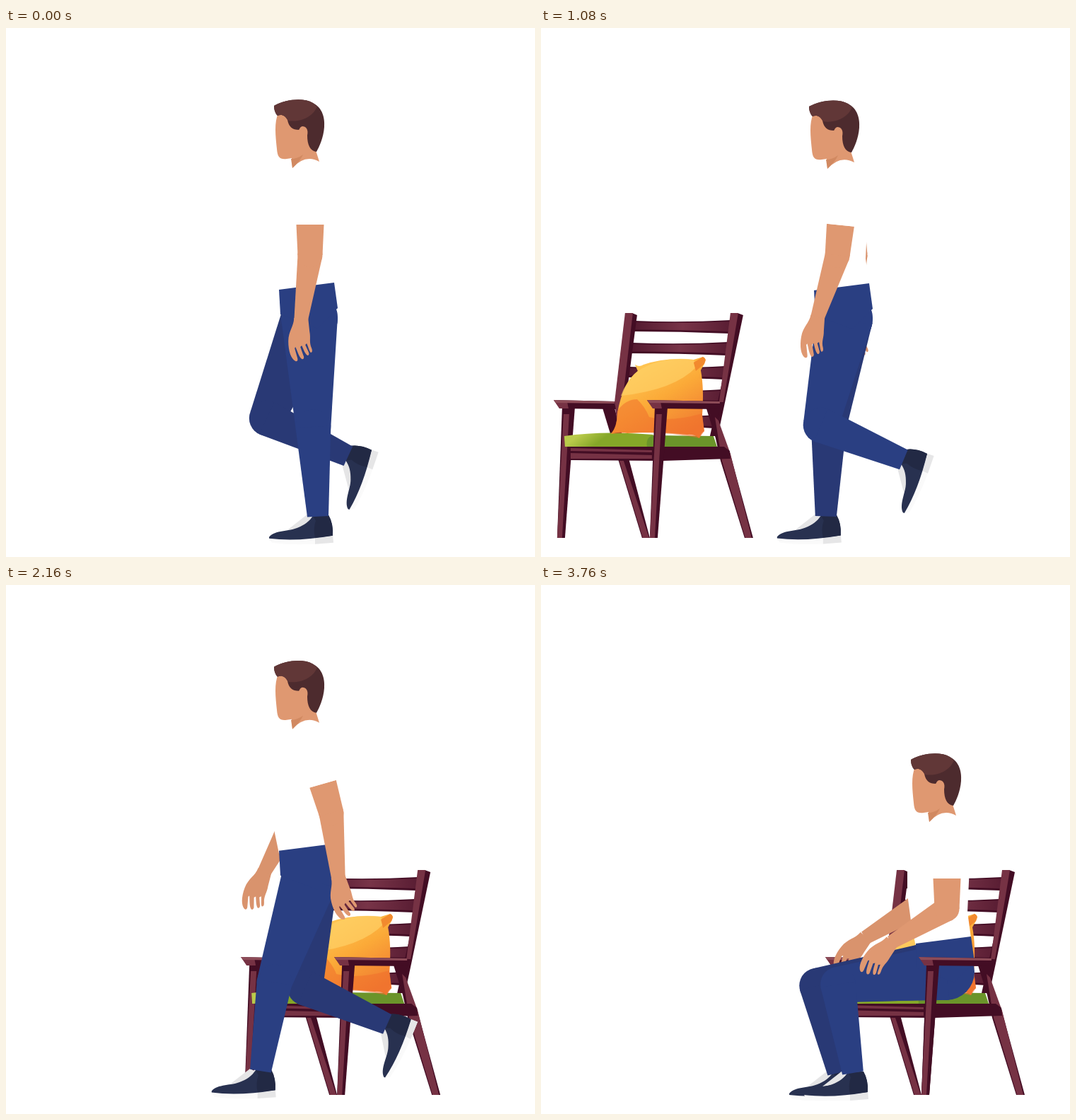
Animation of 748 by 748 pixels, one loop 4.4 s. Source, as an HTML page with a canvas:

```html
<!DOCTYPE html>
<html>
<head>
<meta charset="utf-8">
<style>
html, body { margin: 0; width: 100%; height: 100%; overflow: hidden; background: #fff; }
canvas { display: block; }
</style>
</head>
<body>
<canvas width="748" height="748"></canvas>
<script>
const ctx = document.querySelector('canvas').getContext('2d');
const LOOP = 4400, STEP = 40, END = 3760, STRIDE = 2370, SEATED = 2400;
const THIGH = 154, SHIN = 127, UPPER = 108, FOREARM = 92, SLEEVE = 65;
const SKIN = '#df9871', SKIN_FAR = '#d9936d', PANTS = '#2a3f82', PANTS_FAR = '#293975';
const WOOD = '#763244', DARK = '#430d24', EDGE = '#8d4c58';

// Walk cycle: phase, upper angle, lower angle (degrees forward from straight down), foot tilt
const legCycle = [
  [0, -2, -3, 0], [.088, -9, -13.5, 0], [.2, -17, -30, 17], [.298, -14.5, -43, 38],
  [.4, 0, -66, 62], [.5, 23, -65, 67], [.591, 41.5, -39.6, 42], [.7, 48, -8, 8],
  [.798, 44.5, 19, -20], [.85, 30, 22, -8], [.925, 16, 6, 0]
];
const armCycle = [
  [0, 0, 8], [.091, 6, 15], [.25, 24, 57], [.3, 23, 54], [.5, 0, 8],
  [.591, -16.4, -6], [.798, -32, -22], [.9, -18, -8]
];
// Time, x, y
const bodyPath = [
  [0, 0, 0], [200, 0, 5], [520, 0, 12], [720, 0, 9], [1060, 0, 1.5], [1185, 0, 0],
  [1400, 0, 5], [1740, 0, 11.5], [1880, 0, 12], [2060, 0, 9], [2240, 0, 3], [2370, 0, 0],
  [2440, 0, 5.5], [2800, 3, 5], [3000, 15, 7], [3240, 53, 14], [3360, 76, 29],
  [3560, 117, 88], [3760, 144, 137]
];
// Time, ankle x, ankle y, foot tilt
const nearStep = [[2370, 441, 690, 0], [2440, 467, 690, 0], [2640, 462, 687, 4], [2840, 441, 690, 0]];
const farStep = [[2370, 483, 603, 67], [2440, 482, 612, 67], [2680, 426, 665, 22], [2840, 420, 690, 0]];
// Time, upper angle, lower angle
const nearRest = [[2370, 0, 8], [2960, 0, 8], [3240, 0, 21.5], [3760, 0, 59]];
const farRest = [[2370, 0, 8], [2960, 0, 8], [3240, 0, 18], [3760, 20, 59]];

function slope(keys, i, c) {
  const a = keys[i - 1], b = keys[i], d = keys[i + 1];
  if (!a || !d || (b[c] - a[c]) * (d[c] - b[c]) <= 0) return 0;
  return (d[c] - a[c]) / (d[0] - a[0]);
}

function sample(keys, t) {
  const last = keys.length - 1;
  if (t <= keys[0][0]) return keys[0].slice(1);
  if (t >= keys[last][0]) return keys[last].slice(1);
  const i = keys.findIndex(k => k[0] > t) - 1;
  const a = keys[i], b = keys[i + 1], span = b[0] - a[0], u = (t - a[0]) / span;
  return a.slice(1).map((v, n) => {
    const c = n + 1, m = slope(keys, i, c) * span, k = slope(keys, i + 1, c) * span;
    return v + m * u + (3 * (b[c] - v) - 2 * m - k) * u * u + (2 * (v - b[c]) + m + k) * u ** 3;
  });
}

function cycle(keys, phase) {
  const shift = (k, d) => [k[0] + d, ...k.slice(1)];
  return sample([shift(keys.at(-1), -1), ...keys, shift(keys[0], 1), shift(keys[1], 1)], phase % 1);
}

const reach = ([x, y], length, deg) => {
  const a = deg * Math.PI / 180;
  return [x - length * Math.sin(a), y + length * Math.cos(a)];
};

function bendKnee(hip, ankle) {
  const dx = ankle[0] - hip[0], dy = ankle[1] - hip[1];
  const d = Math.min(Math.hypot(dx, dy), THIGH + SHIN);
  const along = (THIGH ** 2 - SHIN ** 2 + d * d) / (2 * d);
  const out = Math.sqrt(Math.max(0, THIGH ** 2 - along ** 2));
  return [hip[0] + (dx * along - dy * out) / d, hip[1] + (dy * along + dx * out) / d];
}

function fill(color, path) {
  ctx.fillStyle = color;
  ctx.fill(new Path2D(path));
}

const poly = (color, ...points) => fill(color, 'M' + points.join('L') + 'Z');

function disc([x, y], r, color) {
  ctx.fillStyle = color;
  ctx.beginPath();
  ctx.arc(x, y, r, 0, 7);
  ctx.fill();
}

function taper([x, y], [u, v], r, s, color) {
  const d = Math.hypot(u - x, v - y) || 1, nx = (v - y) / d, ny = (x - u) / d;
  poly(color, [x + nx * r, y + ny * r], [u + nx * s, v + ny * s],
    [u - nx * s, v - ny * s], [x - nx * r, y - ny * r]);
}

function at([x, y], deg, draw) {
  ctx.save();
  ctx.translate(x, y);
  ctx.rotate(deg * Math.PI / 180);
  draw();
  ctx.restore();
}

function gradient(x0, y0, x1, y1, ...colors) {
  const g = ctx.createLinearGradient(x0, y0, x1, y1);
  colors.forEach((c, i) => g.addColorStop(i / (colors.length - 1), c));
  return g;
}

function shoe() {
  fill('#e5e5e6', 'M-43 19L-15-3L-6 1Q-14 13-30 17Z');
  fill('#fafafa', 'M-69 31Q-30 34 21 26L22 37Q-30 42-65 37Z');
  fill('#e6e6e7', 'M-4 30L21 26L22 37L-4 39Z');
  fill('#283150', 'M-69 29C-61 19-40 21-29 16C-19 12-12 7-7-1L15-2Q22 10 21 27Q-30 36-69 31Z');
  fill('#222944', 'M-7-1L15-2Q22 10 21 27L-4 30Q-7 18-3 6Z');
}

function hand(color) {
  fill(color, 'M-10-2C-10 10-18 16-18 31C-18 45-14 56-8 59Q-4 60-5 55L-9 41L-8 39' +
    'C-5 45-3 53 1 56Q4 57 4 53L-1 39L1 37C4 44 6 49 9 51Q12 51 11 47L6 36L8 34' +
    'C11 41 12 46 14 47Q17 46 15 41C11 32 14 27 12 17L10-2Z');
}

function leg(hip, knee, ankle, tilt, color) {
  at(ankle, -tilt, shoe);
  disc(hip, 40, color);
  taper(hip, knee, 40, 25, color);
  disc(knee, 25, color);
  taper(knee, ankle, 25, 15, color);
}

function arm(shoulder, [upper, lower], color) {
  const cuff = reach(shoulder, SLEEVE, upper);
  const elbow = reach(shoulder, UPPER, upper);
  const wrist = reach(elbow, FOREARM, lower);
  at(wrist, lower - 8 - Math.max(0, lower - 30) * .4, () => hand(color));
  taper(elbow, wrist, 17.5, 9.8, color);
  disc(elbow, 17.5, color);
  taper(cuff, elbow, 19.5, 17.5, color);
  taper(shoulder, cuff, 21, 20, '#fff');
}

function head() {
  fill(SKIN, 'M385 120C379 134 381 152 383 171C384 183 387 186 397 185L404 184L405 198' +
    'Q423 178 443 189L438 173L430 120Z');
  fill('#d18961', 'M403 185Q412 185 420 179Q416 188 405 198Z');
  fill('#4d2b2e', 'M379 110C395 101 420 98 434 106C448 113 451 128 450 140C449 155 443 168 439 175' +
    'C430 174 426 165 426 152C428 143 424 139 419 139C415 140 415 144 414 144C405 144 400 140 398 130' +
    'C394 122 388 122 384 124C380 120 379 114 379 110Z');
  fill('#613737', 'M379 110C395 101 420 98 434 106L440 111C434 126 415 134 399 131' +
    'C394 122 388 122 384 124C380 120 379 114 379 110Z');
}

function person(t) {
  const [x, y] = sample(bodyPath, t), walking = t < STRIDE, phase = t / STRIDE;
  const hip = [429 + x, 410 + y], shoulder = [430 + x, 213 + y];

  const drawLeg = (offset, steps, color, lean) => {
    const joint = [hip[0] + lean, hip[1]];
    if (walking) {
      const [a, b, tilt] = cycle(legCycle, phase + offset);
      const knee = reach(joint, THIGH, a);
      leg(joint, knee, reach(knee, SHIN, b), tilt, color);
    } else {
      const [ax, ay, tilt] = sample(steps, t);
      leg(joint, bendKnee(joint, [ax, ay]), [ax, ay], tilt, color);
    }
  };
  const drawArm = (offset, rest, color) =>
    arm(shoulder, walking ? cycle(armCycle, phase + offset) : sample(rest, t), color);

  drawArm(.5, farRest, SKIN_FAR);
  at([x, y], 0, () => fill('#fff',
    'M405 198Q423 178 443 189Q462 200 463 240L459 325L464 362L386 374L380 345L374 300V240Q378 208 405 198Z'));
  drawLeg(.5, farStep, PANTS_FAR, -30 * Math.max(0, (t - 3240) / 520));
  drawLeg(0, nearStep, PANTS, 0);
  at([x, y], 0, () => {
    poly(PANTS, [386, 370], [464, 360], [469, 396], [440, 425], [388, 405]);
    head();
  });
  drawArm(0, nearRest, SKIN);
}

function cushion() {
  fill(gradient(225, 470, 290, 580, '#ffcb58', '#fbaa38', '#f07a31'),
    'M226 476Q232 480 238 476Q270 465 309 469L322 465Q328 467 324 475L319 484Q324 510 321 548' +
    'L324 570Q320 572 317 580Q310 574 300 575Q260 570 215 573Q204 570 192 574Q201 564 201 545' +
    'Q209 500 230 485Z');
  fill('rgba(255,211,105,.65)', 'M230 485Q265 463 309 469L313 479Q282 512 206 520Q213 500 230 485Z');
  fill('rgba(240,112,45,.55)', 'M201 542Q212 525 229 525Q240 535 246 550Q275 558 321 545L324 570' +
    'L317 580Q260 568 192 574Q201 564 201 542Z');
  fill('#f28a2e', 'M309 473L322 465Q328 467 324 475L312 485Z');
}

function frontLeg(dx) {
  poly(DARK, [254 + dx, 537], [272 + dx, 537], [258 + dx, 721], [247 + dx, 721]);
  poly(WOOD, [256 + dx, 546], [264 + dx, 546], [254 + dx, 721], [247 + dx, 721]);
}

function armrest(dx, right) {
  poly(DARK, [243 + dx, 526], [right, 528], [right + 2, 539], [252 + dx, 538]);
  poly(WOOD, [243 + dx, 526], [262 + dx, 528], [264 + dx, 538], [251 + dx, 538]);
  poly(EDGE, [243 + dx, 526], [right, 528], [right, 531], [246 + dx, 530]);
}

function chairFront() {
  frontLeg(0);
  armrest(0, 346);
}

function chair() {
  poly(DARK, [180, 537], [197, 537], [218, 612], [247, 721], [236, 721]);
  poly(WOOD, [204, 612], [210, 612], [246, 721], [237, 721]);
  for (const [y, left, right] of [[414, 225, 362], [445, 221, 358], [479, 217, 354], [512, 213, 350], [548, 209, 341]]) {
    fill(DARK, `M${left} ${y}Q290 ${y + 3} ${right} ${y - 1}L${right - 3} ${y + 18}Q290 ${y + 15} ${left - 3} ${y + 15}Z`);
    fill(gradient(left, 0, right, 0, '#541a30', '#783448', '#591d33'),
      `M${left} ${y + 2}Q290 ${y + 4} ${right} ${y + 1}L${right - 3} ${y + 15}Q290 ${y + 13} ${left - 3} ${y + 12}Z`);
  }
  poly(DARK, [222, 403], [229, 406], [207, 573], [200, 573]);
  poly(WOOD, [212, 403], [223, 403], [203, 573], [197, 530]);
  poly(DARK, [371, 403], [379, 406], [352, 535], [343, 577], [332, 577]);
  poly(WOOD, [361, 403], [372, 403], [351, 529], [345, 529]);
  poly(DARK, [327, 538], [347, 538], [340, 555], [360, 600], [393, 721], [381, 721], [347, 612], [340, 580]);
  poly(WOOD, [339, 550], [344, 555], [361, 602], [391, 721], [382, 721], [349, 612]);
  frontLeg(-131);
  armrest(-132, 197);
  poly(DARK, [133, 592], [352, 592], [360, 598], [361, 609], [265, 612], [134, 611]);
  poly(WOOD, [135, 594], [250, 597], [250, 600], [135, 598]);
  poly(WOOD, [135, 601], [250, 604], [250, 609], [135, 609]);
  fill(gradient(150, 573, 165, 593, '#bacb4b', '#85a728'), 'M126 577Q180 569 252 575L243 592H127Z');
  fill('#6b942a', 'M243 592Q241 578 252 576L337 577L342 592Z');
  cushion();
  chairFront();
}

function render(now) {
  const t = Math.min(END, Math.floor(now % LOOP / STEP) * STEP);
  const chairAt = [291 - .291 * Math.max(0, SEATED - t), 0];
  ctx.fillStyle = '#fff';
  ctx.fillRect(0, 0, 748, 748);
  at(chairAt, 0, chair);
  person(t);
  if (t >= SEATED) at(chairAt, 0, chairFront);
  requestAnimationFrame(render);
}
requestAnimationFrame(render);
</script>
</body>
</html>
```
